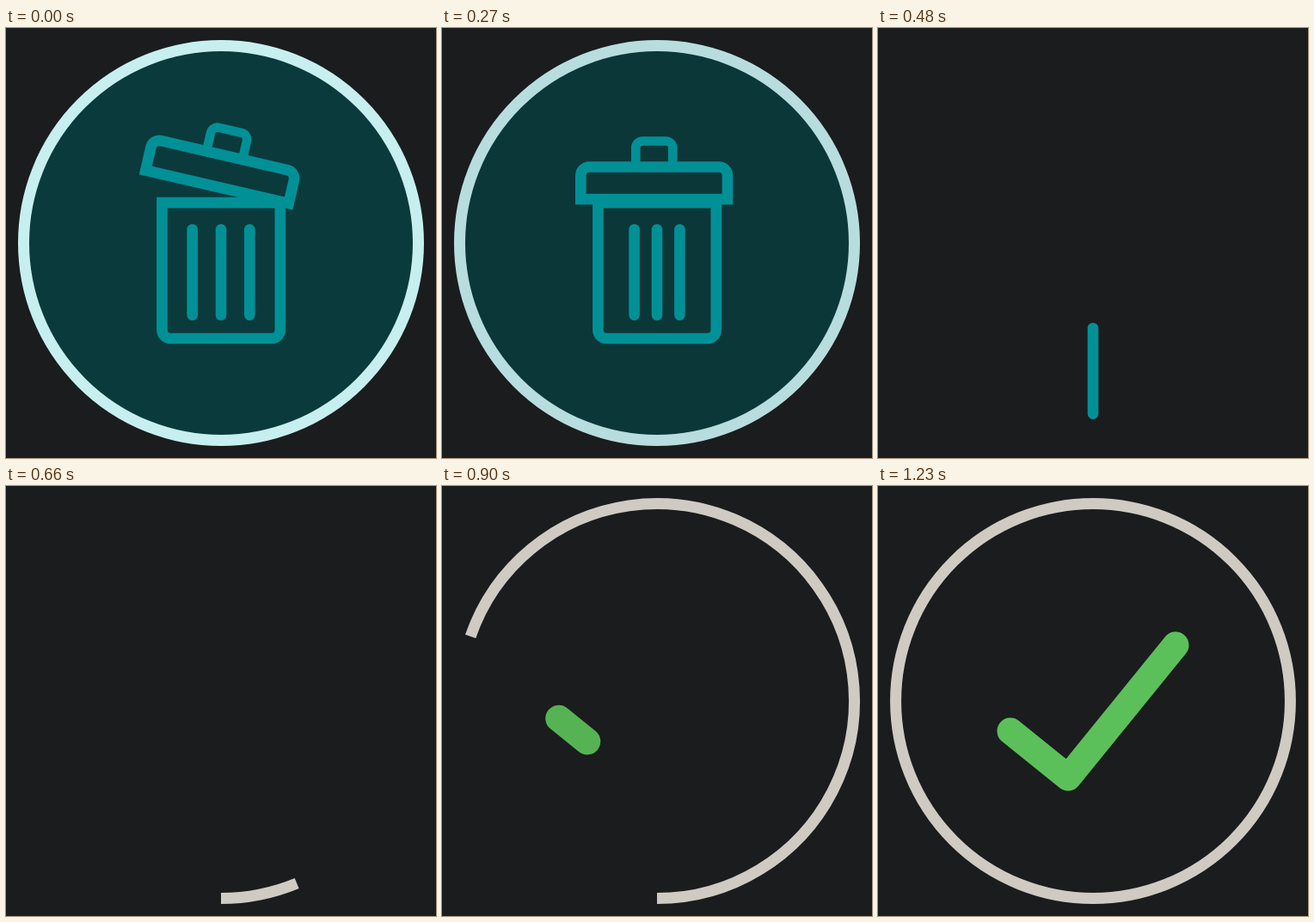
Write an HTML page that moves like this. It is 500 px wide and 500 px high and loops after 1500 ms.

```html
<!DOCTYPE html>
<html lang="en">
<head>
<meta charset="utf-8">
<title>Delete and confirm</title>
<style>
  html, body { margin: 0; height: 100%; overflow: hidden; background: #1b1c1e; }
  svg { display: block; width: 100%; height: 100%; fill: none; }
  #bin, #bars { stroke: #029097; stroke-width: 12.6; }
  #bars { stroke-linecap: round; }
  #check { stroke: #5cc05a; stroke-width: 31; stroke-linecap: round; stroke-linejoin: round; }
</style>
</head>
<body>
<svg viewBox="0 0 500 500">
  <circle id="disc" cx="250" cy="250" r="229.5" fill="#0b3a3c" stroke="#c7eff0" stroke-width="13"/>
  <g id="bin">
    <path d="M181.4 203.1H318.8V351a10 10 0 0 1-10 10H191.4a10 10 0 0 1-10-10Z"/>
    <g id="lid">
      <path d="M161.3 199V171.5a10 10 0 0 1 10-10H322a10 10 0 0 1 10 10V199Z"/>
      <path d="M225.3 158V139.500a8 8 0 0 1 8-8H260.300a8 8 0 0 1 8 8V158" stroke-width="10.6"/>
    </g>
  </g>
  <path id="bars"/>
  <path id="ring" stroke="#cfcbc3" stroke-width="13"/>
  <path id="check"/>
</svg>
<script>
const LOOP = 1500;
const el = id => document.getElementById(id);
const progress = (t, from, to) => Math.min(1, Math.max(0, (t - from) / (to - from)));
const ease = (t, from, to) => {
  const p = progress(t, from, to);
  return p * p * (3 - 2 * p);
};
const mix = (a, b, p) => a + (b - a) * p;

function arcPath(sweep) {
  if (sweep <= 0) return '';
  const r = 229.5;
  const point = a => `${250 + r * Math.sin(a)} ${250 + r * Math.cos(a)}`;
  const angle = sweep * 2 * Math.PI;
  return `M${point(0)}A${r} ${r} 0 0 0 ${point(angle / 2)}A${r} ${r} 0 0 0 ${point(angle)}`;
}

// Distances run along the tick; the elbow lies 86 units after its final start.
function tickPoint(s) {
  const [dx, dy] = s < 86 ? [0.779, 0.628] : [0.63, -0.776];
  return `${221 + dx * (s - 86)} ${339 + dy * (s - 86)}`;
}

function tickPath(p) {
  const start = mix(-27.5, 0, p), end = mix(-27.5, 284.4, p);
  const elbow = end > 86 ? 'L' + tickPoint(86) : '';
  return `M${tickPoint(start)}${elbow}L${tickPoint(end)}`;
}

function draw(t) {
  el('lid').setAttribute('transform', `rotate(${13 * (1 - ease(t, 30, 230))} 309 186.6)`);
  el('disc').setAttribute('opacity', 1 - ease(t, 245, 391));
  el('bin').setAttribute('opacity', 1 - ease(t, 335, 430));

  const gap = 33.3 * (1 - ease(t, 230, 370));
  const top = 234.2 + 276 * ease(t, 410, 570);
  el('bars').setAttribute('d', t < 570
    ? [-gap, 0, gap].map(x => `M${250 + x} ${top}v99.600`).join('') : '');

  el('ring').setAttribute('d', arcPath(ease(t, 585, 1083)));
  el('check').setAttribute('d', t > 795 ? tickPath(ease(t, 795, 1230)) : '');
  el('check').setAttribute('opacity', progress(t, 795, 910));
}

const begin = performance.now();
function tick() {
  draw((performance.now() - begin) % LOOP);
  requestAnimationFrame(tick);
}
tick();
</script>
</body>
</html>
```
